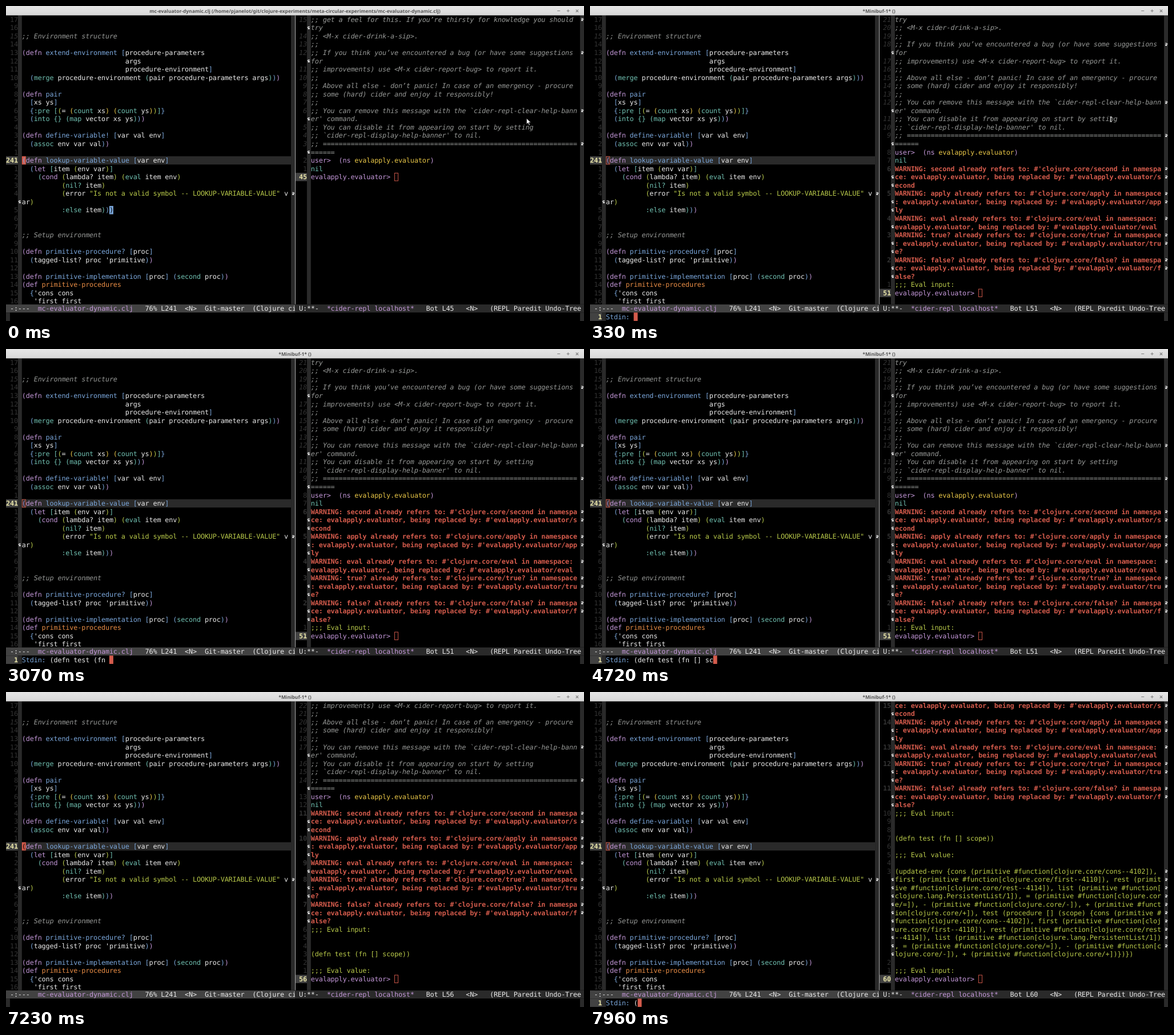
An HTML page with a canvas for the animation above (8 s loop, 1012 by 553 pixels).

```html
<!DOCTYPE html>
<html lang="en">
<head>
<meta charset="utf-8">
<title>Editor session</title>
<style>
html, body { margin: 0; width: 1012px; height: 553px; overflow: hidden; background: #000; }
canvas { display: block; }
</style>
</head>
<body>
<canvas id="stage" width="1012" height="553"></canvas>
<script>
const ctx = document.getElementById('stage').getContext('2d');

// The layout uses a 1600 px wide desktop with 11 x 23 px character cells.
const W = 1600, CW = 11, RH = 23, TOP = 26, COLS = 67;
const MARGIN = 33, TEXT = 44, PANE = 800, MODE_Y = 828, MINI_Y = 851;
const LOOP = 8000;

const C = {
  fg: '#eaeaea', comment: '#969896', red: '#d45b4c', orange: '#e78c45', yellow: '#e7c547',
  green: '#b9ca4a', aqua: '#70c0b1', blue: '#7aa6da', purple: '#c397d8',
  line: '#2a2a2a', bar: '#424242', num: '#333', numNow: '#e8e4a8'
};
const RING = [C.purple, C.blue, C.aqua, C.green, C.yellow, C.orange];
const KEYWORDS = new Set(['defn', 'def', 'let', 'cond', 'ns']);
const CORE = new Set(['merge', 'count', 'into', 'map', 'assoc', 'eval', 'nil?', 'second']);
const NAMES = { defn: C.blue, def: C.orange, ns: C.yellow };

const span = (text, color = C.fg, style = '') => [...text].map(ch => ({ ch, color, style }));

function lisp(source) {
  let depth = 0, prev = '';
  const paint = tok => {
    if (tok[0] === ';') return span(tok, C.comment, 'italic');
    if (tok[0] === '"') return span(tok, C.green);
    if ('([{'.includes(tok)) return span(tok, RING[depth++]);
    if (')]}'.includes(tok)) return span(tok, RING[--depth]);
    if (tok[0] === ':' || CORE.has(tok)) return span(tok, C.aqua);
    if (KEYWORDS.has(tok)) return span(tok, C.purple);
    return span(tok, NAMES[prev]);
  };
  return source.split('\n').map(line =>
    (line.match(/;.*|"[^"]*"|[()[\]{}]|[^\s()[\]{}]+|\s+/g) || []).flatMap(tok => {
      const cells = paint(tok);
      if (tok.trim()) prev = tok;
      return cells;
    }));
}

// Wraps lines into screen rows, numbered relative to the current line.
function layout(lines, current, absolute) {
  return lines.flatMap((cells, i) => {
    const rows = [], now = i === current;
    for (let at = 0; at === 0 || at < cells.length; at += COLS)
      rows.push({
        cells: cells.slice(at, at + COLS),
        label: String(now ? absolute : Math.abs(i - current)),
        now, continued: at > 0, more: at + COLS < cells.length
      });
    return rows;
  });
}

const code = layout(lisp(`

;; Environment structure

(defn extend-environment [procedure-parameters
                          args
                          procedure-environment]
  (merge procedure-environment (pair procedure-parameters args)))

(defn pair
  [xs ys]
  {:pre [(= (count xs) (count ys))]}
  (into {} (map vector xs ys)))

(defn define-variable! [var val env]
  (assoc env var val))

(defn lookup-variable-value [var env]
  (let [item (env var)]
    (cond (lambda? item) (eval item env)
          (nil? item)
          (error "Is not a valid symbol -- LOOKUP-VARIABLE-VALUE" var)
          :else item)))


;; Setup environment

(defn primitive-procedure? [proc]
  (tagged-list? proc 'primitive))

(defn primitive-implementation [proc] (second proc))
(def primitive-procedures
  {'cons cons
   'first first`), 17, 241);

const banner = `;;   a var, a Java method)
;; * Enable \`eldoc-mode' to display function & method signatures in the minibuffer.
;; * Print CIDER's refcard and keep it close to your keyboard.
;;
;; CIDER is super customizable - try <M-x customize-group cider> to
;; get a feel for this. If you’re thirsty for knowledge you should try
;; <M-x cider-drink-a-sip>.
;;
;; If you think you’ve encountered a bug (or have some suggestions for
;; improvements) use <M-x cider-report-bug> to report it.
;;
;; Above all else - don’t panic! In case of an emergency - procure
;; some (hard) cider and enjoy it responsibly!
;;
;; You can remove this message with the \`cider-repl-clear-help-banner' command.
;; You can disable it from appearing on start by setting
;; \`cider-repl-display-help-banner' to nil.
;; ${'='.repeat(70)}`;

const warning = name => span(`WARNING: ${name} already refers to: #'clojure.core/${name} in namespace: ` +
  `evalapply.evaluator, being replaced by: #'evalapply.evaluator/${name}`, C.red, 'bold');
const output = text => text.split('\n').map(line => span(line, C.green));
const primitives = ['cons core/cons--4102', 'first core/first--4110', 'rest core/rest--4114',
  'list lang.PersistentList/1', '= core/=', '- core/-', '+ core/+']
  .map(p => p.replace(/ (.*)/, ' (primitive #function[clojure.$1])')).join(', ');

const FIRST_LINE = 25;
const log = [
  ...banner.split('\n').map(line => span(line, C.comment, 'italic')),
  [...span('user>  ', C.purple), ...lisp('(ns evalapply.evaluator)')[0]],
  span('nil', C.aqua),
  ...['second', 'apply', 'eval', 'true?', 'false?'].map(warning),
  ...output(`;;; Eval input:


(defn test (fn [] scope))

;;; Eval value:

(updated-env {${primitives}, test (procedure [] (scope) {${primitives}})})

;;; Eval input:`)
];
const prompt = span('evalapply.evaluator> ', C.purple);

function replRows(last) {
  const n = last - FIRST_LINE;
  const rows = layout([...log.slice(0, n), prompt], n, last).slice(last === 45 ? -20 : -34);
  rows[0] = { ...rows[0], continued: false };
  return rows;
}

function rect(x, y, w, h, color) {
  ctx.fillStyle = color;
  ctx.fillRect(x, y, w, h);
}

function text(cells, x, y) {
  cells.forEach(({ ch, color, style }, i) => {
    if (ch === ' ') return;
    ctx.font = `${style} 18.67px "DejaVu Sans Mono", monospace`;
    ctx.fillStyle = color;
    ctx.fillText(ch, x + i * CW, y + 18);
  });
}

function hollow(x, y) {
  ctx.strokeStyle = C.red;
  ctx.lineWidth = 1.5;
  ctx.strokeRect(x + 0.75, y + 0.75, CW - 1.5, RH - 1.5);
}

function block(x, y, color, ch = ' ', ink = '#000') {
  rect(x, y, CW, RH, color);
  text(span(ch, ink), x, y);
}

// Curly wrap arrow, centred in a fringe.
function wrapMark(x, y, dir) {
  ctx.save();
  ctx.translate(x + 5.5, y + 11.5);
  ctx.scale(dir, 1);
  ctx.fillStyle = ctx.strokeStyle = C.fg;
  ctx.lineWidth = 2;
  ctx.beginPath();
  ctx.moveTo(-2, -3);
  ctx.bezierCurveTo(4, -3.5, 4.5, 0, 1, 1);
  ctx.stroke();
  ctx.beginPath();
  ctx.moveTo(-2, -1);
  ctx.lineTo(-2, 4);
  ctx.lineTo(3, 4);
  ctx.lineTo(2, 1);
  ctx.fill();
  ctx.restore();
}

function lineNumber(x, y, label, now, style = '') {
  if (now) rect(x, y, MARGIN, RH, C.bar);
  text(span(label.padStart(3), now ? C.numNow : C.num, now ? 'bold' : style), x, y);
}

function pane(x, rows, highlight) {
  const right = x + PANE - CW;
  rect(x + MARGIN, TOP, CW, MODE_Y - TOP, C.line);
  rect(right, TOP, CW, MODE_Y - TOP, C.line);
  rows.forEach((row, i) => {
    const y = TOP + i * RH;
    if (!row.continued) lineNumber(x, y, row.label, row.now, row.cells[0]?.style);
    if (row.now && highlight) rect(x + TEXT, y, right - x - TEXT, RH, C.line);
    if (row.continued) wrapMark(x + MARGIN, y, -1);
    if (row.more) wrapMark(right, y, 1);
    text(row.cells, x + TEXT, y);
  });
}

function modeLine(x, color, state, buffer, rest) {
  ctx.save();
  ctx.beginPath();
  ctx.rect(x, MODE_Y, PANE, RH);
  ctx.clip();
  rect(x, MODE_Y, PANE, RH, color);
  text([...span(state), ...span(buffer, C.purple), ...span(rest)], x, MODE_Y);
  ctx.restore();
}

function titleBar(title) {
  const shade = ctx.createLinearGradient(0, 0, 0, TOP);
  shade.addColorStop(0, '#e6e6e6');
  shade.addColorStop(1, '#d8d8d8');
  rect(0, 0, W, TOP, shade);
  ctx.font = 'bold 13.33px "Noto Sans", sans-serif';
  ctx.fillStyle = '#555';
  ctx.textAlign = 'center';
  ctx.fillText(title, W / 2, 19);
  ctx.textAlign = 'left';
  ctx.strokeStyle = '#808080';
  ctx.lineWidth = 1.8;
  ctx.beginPath();
  const stroke = (x1, y1, x2, y2) => { ctx.moveTo(x1, y1); ctx.lineTo(x2, y2); };
  stroke(1526, 13.5, 1534, 13.5);
  stroke(1552, 13.5, 1560, 13.5);
  stroke(1556, 9.5, 1556, 17.5);
  stroke(1577.5, 10, 1584.5, 17);
  stroke(1584.5, 10, 1577.5, 17);
  ctx.stroke();
}

function pointer(kind) {
  if (!kind) return;
  ctx.save();
  ctx.translate(1441, 312);
  ctx.beginPath();
  if (kind === 'arrow') {
    [[0, 0], [0, 16], [4, 12.5], [7, 19], [9.5, 18], [6.5, 11.5], [12, 11.5]]
      .forEach(p => ctx.lineTo(...p));
    ctx.closePath();
    ctx.fillStyle = '#fff';
    ctx.fill();
    ctx.strokeStyle = '#000';
    ctx.lineWidth = 1;
  } else {
    ctx.moveTo(-2, -4); ctx.lineTo(4, -4);
    ctx.moveTo(1, -4); ctx.lineTo(1, 9);
    ctx.moveTo(-2, 9); ctx.lineTo(4, 9);
    ctx.strokeStyle = '#fff';
    ctx.lineWidth = 1.6;
  }
  ctx.stroke();
  ctx.restore();
}

// Typing runs: time of the first key, time of the last key, keys.
const RUNS = [
  [970, 970, '('], [1160, 1440, 'defn'], [1610, 2050, ' test '], [2630, 2630, '('],
  [2830, 2910, 'fn'], [3070, 3070, ' '], [3610, 3660, '[]'], [4380, 4380, ' '],
  [4660, 4720, 'sc'], [5170, 5170, 'o'], [5310, 5410, 'pe'], [5690, 5690, ')'], [5950, 5950, ')']
];

function typed(t) {
  if (t >= 6300) return t >= 7960 ? '(' : '';
  return RUNS.map(([from, to, keys]) => {
    if (t < from) return '';
    if (t >= to) return keys;
    return keys.slice(0, 1 + Math.floor((t - from) / (to - from) * (keys.length - 1)));
  }).join('');
}

const FILE = 'mc-evaluator-dynamic.clj';
const PATH = '/home/pjanelot/git/clojure-experiments/meta-circular-experiments/' + FILE;

// Value of the last step whose start time has passed.
const step = (t, steps) => steps.filter(([from]) => t >= from).pop()[1];

const stateAt = t => ({
  last: step(t, [[0, 45], [270, 48], [330, 51], [7230, 56], [7290, 60]]),
  mini: step(t, [[0, ''], [220, 'load'], [330, 'stdin'], [7160, ''], [7340, 'stdin']]),
  mouse: step(t, [[0, 'arrow'], [270, 'beam'], [930, '']]),
  fresh: t < 330,
  input: typed(t)
});

function miniBuffer(mini, input) {
  rect(W - CW, MINI_Y, CW, RH + 1, C.line);
  if (mini === 'stdin') {
    const cells = [...span('Stdin: ', C.blue), ...span(input)];
    lineNumber(0, MINI_Y, '1', true);
    rect(MARGIN, MINI_Y, CW, RH + 1, C.line);
    text(cells, TEXT, MINI_Y);
    block(TEXT + cells.length * CW, MINI_Y, C.red);
  } else {
    rect(0, MINI_Y, CW, RH + 1, C.line);
    if (mini) text(span(`Loading ${PATH}...`), CW, MINI_Y);
  }
}

function draw({ last, mini, mouse, fresh, input }) {
  ctx.setTransform(1012 / W, 0, 0, 1012 / W, 0, 0);
  ctx.textRendering = 'geometricPrecision';
  rect(0, 0, W, 880, '#000');

  pane(0, code, true);
  const cursorY = TOP + 17 * RH;
  if (mini === 'stdin') hollow(TEXT, cursorY);
  else block(TEXT, cursorY, C.red, '(', fresh ? C.blue : '#000');
  if (fresh) block(TEXT + 22 * CW, TOP + 23 * RH, C.blue, ')');

  const rows = replRows(last);
  pane(PANE, rows, false);
  hollow(PANE + TEXT + prompt.length * CW, TOP + (rows.length - 1) * RH);
  rect(PANE, TOP, 1.6, MODE_Y - TOP, '#a8a8a8');

  modeLine(0, C.bar, ' -:---  ', FILE, '   76% L241  <N>  Git-master  (Clojure ci');
  modeLine(PANE, C.line, ' U:**-  ', '*cider-repl localhost*',
    `   Bot L${last}   <N>   (REPL Paredit Undo-Tree`);
  miniBuffer(mini, input);
  titleBar(fresh ? `${FILE} (${PATH})` : '*Minibuf-1* ()');
  pointer(mouse);
}

let shown = '';
function frame() {
  const state = stateAt(performance.now() % LOOP), key = JSON.stringify(state);
  if (key !== shown) draw(state);
  shown = key;
  requestAnimationFrame(frame);
}
frame();
</script>
</body>
</html>
```
